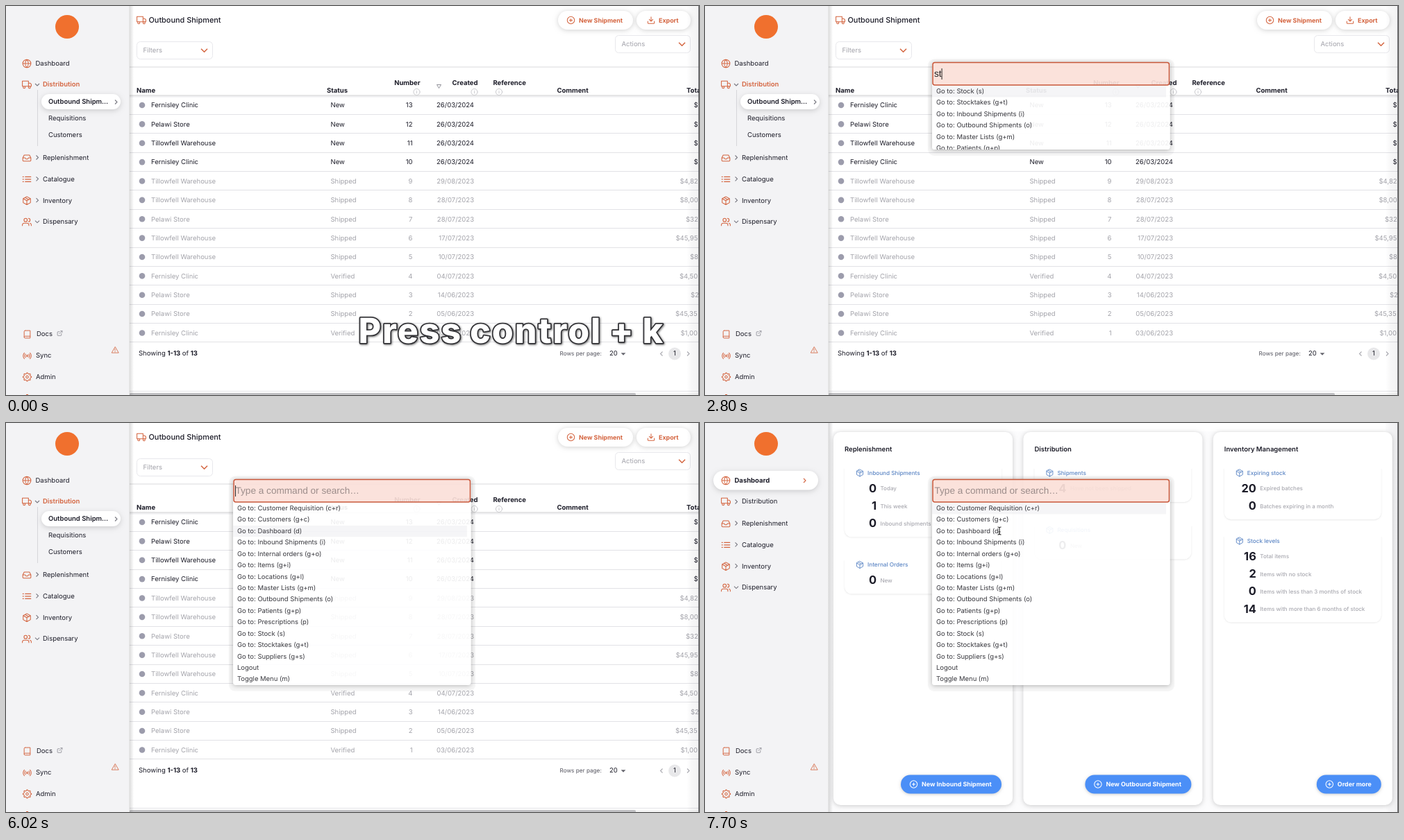
An HTML page with a canvas that plays this animation: 998 px wide and 561 px high, repeating every 8 s.

```html
<!DOCTYPE html>
<html lang="en">
<head>
<meta charset="utf-8">
<title>Command palette</title>
<style>
  html, body { margin: 0; width: 100%; height: 100%; overflow: hidden; background: #fff; }
  canvas { display: block; width: 998px; height: 561px; }
</style>
</head>
<body>
<canvas id="stage"></canvas>
<script>
const W = 998, H = 561, LOOP = 8000;
const canvas = document.getElementById('stage');
const ctx = canvas.getContext('2d');
const dpr = window.devicePixelRatio || 1;
canvas.width = W * dpr;
canvas.height = H * dpr;
ctx.textRendering = 'geometricPrecision';

const ORANGE = '#d4643f', INK = '#1c1c28', GREY = '#a3a3aa', BLUE = '#5b85c4';
const clamp = v => Math.max(0, Math.min(1, v));
const easeOut = p => 1 - (1 - clamp(p)) ** 2;
const smooth = p => { p = clamp(p); return p * p * (3 - 2 * p); };
const mix = (a, b, p) => a + (b - a) * p;

// Icons on a 24 unit grid
const ICONS = {
  globe: 'M22 12a10 10 0 1 1-20 0a10 10 0 1 1 20 0M2 12h20M12 2c5 6 5 14 0 20c-5-6-5-14 0-20',
  truck: 'M1 3h15v13H1zM16 8h4l3 3v5h-7M8 18.5a2.5 2.5 0 1 1-5 0a2.5 2.5 0 1 1 5 0M21 18.5a2.5 2.5 0 1 1-5 0a2.5 2.5 0 1 1 5 0',
  inbox: 'M22 12h-6l-2 3h-4l-2-3H2M5.5 5L2 12v6a2 2 0 0 0 2 2h16a2 2 0 0 0 2-2v-6l-3.500-7z',
  list: 'M8 6h14M8 12h14M8 18h14M2 6h2M2 12h2M2 18h2',
  box: 'M12 2l9 5v10l-9 5l-9-5V7zM3 7l9 5l9-5M12 12v10M7.500 4.500l9 5',
  users: 'M17 21v-2a4 4 0 0 0-4-4H5a4 4 0 0 0-4 4v2M13 7a4 4 0 1 1-8 0a4 4 0 1 1 8 0M23 21v-2a4 4 0 0 0-3-4M16 3a4 4 0 0 1 0 8',
  book: 'M4 19.500A2.500 2.500 0 0 1 6.500 17H20M6.500 2H20v20H6.500A2.500 2.500 0 0 1 4 19.500v-15A2.500 2.500 0 0 1 6.500 2',
  link: 'M18 13v6a2 2 0 0 1-2 2H5a2 2 0 0 1-2-2V8a2 2 0 0 1 2-2h6M15 3h6v6M10 14L21 3',
  radio: 'M14 12a2 2 0 1 1-4 0a2 2 0 1 1 4 0M16.200 7.800a6 6 0 0 1 0 8.500M7.800 16.200a6 6 0 0 1 0-8.500M19 5a10 10 0 0 1 0 14M5 19a10 10 0 0 1 0-14',
  alert: 'M12 3L1.500 21h21zM12 9v5M12 17v1',
  plus: 'M22 12a10 10 0 1 1-20 0a10 10 0 1 1 20 0M12 8v8M8 12h8',
  down: 'M21 15v4a2 2 0 0 1-2 2H5a2 2 0 0 1-2-2v-4M7 10l5 5l5-5M12 15V3',
  info: 'M22 12a10 10 0 1 1-20 0a10 10 0 1 1 20 0M12 11v5M12 8v.5',
  gear: gearPath()
};
for (const k in ICONS) ICONS[k] = new Path2D(ICONS[k]);

function gearPath() {
  let d = 'M15 12a3 3 0 1 1-6 0a3 3 0 1 1 6 0';
  for (let i = 0; i <= 32; i++) {
    const a = (i - .5) * Math.PI / 16, r = i % 4 < 2 ? 10.5 : 8;
    d += (i ? 'L' : 'M') + (12 + r * Math.cos(a)) + ' ' + (12 + r * Math.sin(a));
  }
  return d;
}

function icon(name, x, y, size = 14, color = ORANGE, weight = 1.8) {
  ctx.save();
  ctx.translate(x - size / 2, y - size / 2);
  ctx.scale(size / 24, size / 24);
  ctx.strokeStyle = color;
  ctx.lineWidth = weight;
  ctx.lineCap = ctx.lineJoin = 'round';
  ctx.stroke(ICONS[name]);
  ctx.restore();
}

function text(s, x, y, { size = 9.5, weight = 400, color = INK, align = 'left', family = 'Inter' } = {}) {
  ctx.font = `${weight} ${size}px ${family}, sans-serif`;
  ctx.fillStyle = color;
  ctx.textAlign = align;
  ctx.textBaseline = 'middle';
  ctx.fillText(s, x, y + .5);
  return ctx.measureText(s).width;
}

function rect(x, y, w, h, color) {
  ctx.fillStyle = color;
  ctx.fillRect(x, y, w, h);
}

function round(x, y, w, h, r, { fill, stroke, line = 1, shadow, blur = 6, dy = 1 } = {}) {
  ctx.save();
  ctx.beginPath();
  ctx.roundRect(x, y, w, h, r);
  if (shadow) {
    ctx.shadowColor = shadow;
    ctx.shadowBlur = blur * dpr;
    ctx.shadowOffsetY = dy * dpr;
  }
  if (fill) { ctx.fillStyle = fill; ctx.fill(); }
  ctx.shadowColor = 'transparent';
  if (stroke) { ctx.strokeStyle = stroke; ctx.lineWidth = line; ctx.stroke(); }
  ctx.restore();
}

function dot(x, y, r, color) {
  ctx.fillStyle = color;
  ctx.beginPath();
  ctx.arc(x, y, r, 0, 7);
  ctx.fill();
}

// Chevron pointing right, turned by quarter turns
function chevron(x, y, turn = 0, r = 3, color = '#777780', line = 1.1) {
  ctx.save();
  ctx.translate(x, y);
  ctx.rotate(turn * Math.PI / 2);
  ctx.strokeStyle = color;
  ctx.lineWidth = line;
  ctx.beginPath();
  ctx.moveTo(-r / 2, -r);
  ctx.lineTo(r / 2, 0);
  ctx.lineTo(-r / 2, r);
  ctx.stroke();
  ctx.restore();
}

function triangle(x, y, r, color, fill) {
  ctx.beginPath();
  ctx.moveTo(x - r, y - r / 2);
  ctx.lineTo(x + r, y - r / 2);
  ctx.lineTo(x, y + r / 2 + (fill ? 0 : 2));
  ctx.closePath();
  ctx.fillStyle = ctx.strokeStyle = color;
  ctx.lineWidth = .8;
  fill ? ctx.fill() : ctx.stroke();
}

// Sidebar; fold runs from 0 (section open) to 1 (closed)
function sidebar(onDash, fold) {
  const edge = ctx.createLinearGradient(177, 0, 184, 0);
  edge.addColorStop(0, 'rgba(0,0,0,.16)');
  edge.addColorStop(1, 'rgba(0,0,0,0)');
  rect(177, 0, 7, H, edge);
  rect(0, 0, 177.5, H, '#f3f3f5');
  dot(88, 30, 17, '#f0702e');

  if (onDash) {
    round(12, 69, 151, 27.5, 14, { fill: '#fff', shadow: 'rgba(0,0,0,.16)', blur: 7, dy: 2 });
    chevron(143.5, 83, 0, 3, ORANGE);
  }
  icon('globe', 30, 83);
  text('Dashboard', 42.5, 82.5, { weight: onDash ? 700 : 400 });

  icon('truck', 30, 113.5);
  chevron(45, 113.5, onDash ? 0 : 1);
  text('Distribution', 53, 113, onDash ? {} : { weight: 600, color: ORANGE });
  if (fold < 1) {
    ctx.save();
    ctx.beginPath();
    ctx.rect(0, 121, 177, 83 * (1 - fold));
    ctx.clip();
    rect(45, 121, 1, 81, '#d6d6da');
    if (!onDash) round(51, 127, 114, 22, 11, { fill: '#fff', shadow: 'rgba(0,0,0,.16)', blur: 7, dy: 2 });
    text('Outbound Shipm…', 61, 138, { weight: 600 });
    chevron(158.5, 138.5);
    text('Requisitions', 61, 162);
    text('Customers', 61, 186);
    ctx.restore();
  }
  [['inbox', 'Replenishment'], ['list', 'Catalogue'], ['box', 'Inventory'], ['users', 'Dispensary']].forEach(([ic, label], i) => {
    const y = 218.5 + i * 30.85 - 74 * fold;
    icon(ic, 30, y + .5);
    chevron(45, y, i === 3 ? 1 : 0);
    text(label, 53, y);
  });

  icon('book', 30.5, 473.5, 13);
  text('Docs', 44, 473);
  icon('link', 77.5, 472, 9, '#777780');
  icon('radio', 30.5, 504.5);
  text('Sync', 43, 504);
  icon('alert', 157, 496, 11);
  icon('gear', 30.5, 535, 14);
  text('Admin', 43, 534.5);
  rect(29, 560, 3, 1, ORANGE);
}

const CLINIC = 'Fernisley Clinic', STORE = 'Pelawi Store', DEPOT = 'Tillowfell Warehouse';
const ROWS = [
  [CLINIC, 'New', '26/03/2024', '$', 990.5],
  [STORE, 'New', '26/03/2024', '$', 990.5],
  [DEPOT, 'New', '26/03/2024', '$', 990.5],
  [CLINIC, 'New', '26/03/2024', '$', 990.5],
  [DEPOT, 'Shipped', '29/08/2023', '$4,82', 970.5],
  [DEPOT, 'Shipped', '28/07/2023', '$8,00', 970.5],
  [STORE, 'Shipped', '28/07/2023', '$32', 979],
  [DEPOT, 'Shipped', '17/07/2023', '$45,95', 964.5],
  [DEPOT, 'Shipped', '10/07/2023', '$8', 985],
  [CLINIC, 'Verified', '04/07/2023', '$4,50', 970],
  [STORE, 'Shipped', '14/06/2023', '$2', 986],
  [STORE, 'Shipped', '05/06/2023', '$45,35', 964],
  [CLINIC, 'Verified', '03/06/2023', '$1,00', 971.5]
];

function rightEdge() {
  const g = ctx.createLinearGradient(980, 0, 998, 0);
  g.addColorStop(0, 'rgba(0,0,20,0)');
  g.addColorStop(.4, 'rgba(0,0,20,.03)');
  g.addColorStop(1, 'rgba(0,0,20,.05)');
  rect(980, 0, 18, H, g);
  rect(997, 0, 1, H, 'rgba(60,60,65,.7)');
}

function pillButton(x, w, ic, label) {
  round(x, 7, w, 27, 13.5, { fill: '#fff', shadow: 'rgba(0,0,0,.18)', blur: 7 });
  icon(ic, x + (ic === 'plus' ? 18.5 : 21), 20.5, 12.5, ORANGE, 2);
  text(label, x + (ic === 'plus' ? 30 : 32), 20.5, { size: 8.9, weight: 700, color: ORANGE });
}

function select(x, y, w, h, label) {
  round(x, y, w, h, 5, { fill: '#fff', stroke: '#e8e8ec' });
  text(label, x + 9, y + h / 2, { color: '#a0a0a8' });
  chevron(x + w - 12, y + h / 2, 1, 4.5, ORANGE, 1.5);
}

function tablePage() {
  rect(177, 0, 821, H, '#fff');
  icon('truck', 195, 20.5);
  text('Outbound Shipment', 205.5, 20.5, { size: 10.9, weight: 500 });
  pillButton(795, 108, 'plus', 'New Shipment');
  pillButton(908, 78, 'down', 'Export');
  select(188.5, 51.5, 109, 25, 'Filters');
  select(877.5, 42.5, 108, 25, 'Actions');

  rect(178, 87.5, 820, 1, '#d9d9dc');
  const head = { weight: 700 }, headR = { weight: 700, align: 'right' };
  text('Name', 188, 121.5, head);
  text('Status', 462, 121.5, head);
  text('Number', 596.5, 110.5, headR);
  text('Created', 679.5, 110.5, headR);
  text('Reference', 701.5, 110.5, head);
  text('Comment', 793.5, 121.5, head);
  text('Total', 980, 121.5, head);
  [591.5, 674.5, 710].forEach(x => icon('info', x, 124, 11, '#b4b4ba', 1.5));
  triangle(623.5, 115, 3, '#777780');
  rect(178, 128.5, 820, 1.2, '#cfcfd2');
  rect(178, 129.7, 820, 2, '#f0f0f2');

  ROWS.forEach(([name, status, date, total, tx], i) => {
    const y = 143 + i * 27.37, color = i < 4 ? INK : GREY;
    dot(196, y, 4.3, '#9c9cac');
    text(name, 209, y, { color });
    text(status, 467.5, y, { color });
    text(13 - i, 585.5, y, { color, align: 'right' });
    text(date, 674, y, { color, align: 'right' });
    text(total, tx, y, { color });
    rect(178, Math.round(y + 13), 820, 1, '#e2e2e6');
  });

  let x = 191;
  x += text('Showing ', x, 501);
  x += text('1-13', x, 501, { weight: 700 });
  x += text(' of ', x, 501);
  text('13', x, 501, { weight: 700 });
  text('Rows per page:', 797.5, 501, { size: 8.2, color: '#55555f' });
  text('20', 869, 501);
  triangle(889, 502, 3.4, '#66666e', true);
  chevron(944, 501.5, 2, 3, '#aaaab0');
  dot(963, 501.5, 9, '#e8e8ea');
  text('1', 963, 501, { align: 'center' });
  chevron(982.5, 501.5, 0, 3, '#aaaab0');
  rect(178, 555, 820, 1, '#e2e2e6');
  rect(178, 558, 820, 3, '#f5f5f5');
  round(178, 558, 729, 4, 2, { fill: '#c1c1c4' });
  rightEdge();
}

// Each card: heading, heading y, stats as [value, label]
const PANELS = [
  ['Replenishment', 'New Inbound Shipment', 145, [
    ['Inbound Shipments', 72, [[0, 'Today'], [1, 'This week'], [0, 'Inbound shipments not delivered']]],
    ['Internal Orders', 204.5, [[0, 'New']]]]],
  ['Distribution', 'New Outbound Shipment', 153, [
    ['Shipments', 72, [[4, 'Have not been shipped']]],
    ['Requisitions', 154.5, [[0, 'New']]]]],
  ['Inventory Management', 'Order more', 93, [
    ['Expiring stock', 72, [[20, 'Expired batches'], [0, 'Batches expiring in a month']]],
    ['Stock levels', 170, [[16, 'Total items'], [2, 'Items with no stock'],
      [0, 'Items with less than 3 months of stock'], [14, 'Items with more than 6 months of stock']]]]]
];

function dashboardPage() {
  rect(177, 0, 821, H, '#fcfcfd');
  rect(184, 0, 796, 12, '#fff');
  rightEdge();
  PANELS.forEach(([title, button, bw, cards], i) => {
    const x = 201 + i * 273.4;
    round(x - 16, 13, 258, 538, 10, { fill: '#fff', shadow: 'rgba(0,0,0,.2)', blur: 7 });
    text(title, x, 37.5, { weight: 600 });
    cards.forEach(([name, y, stats]) => {
      const h = 42 + 25.2 * (stats.length - 1);
      round(x, y - 15, 226, h + 15, 10, { fill: '#fff', shadow: 'rgba(0,0,0,.1)', blur: 2, dy: .7 });
      rect(x - 2, y - 18, 230, 12, '#fff');
      icon('box', x + 22, y, 12, BLUE);
      text(name, x + 33, y, { size: 8.2, weight: 500, color: BLUE });
      stats.forEach(([n, label], k) => {
        const sy = y + 22.5 + k * 25.2;
        text(n, x + 46, sy, { size: 16.4, weight: 700, align: 'right' });
        text(label, x + 51.5, sy, { size: 8, weight: 500, color: '#a9a9b0' });
      });
    });
    const bx = x + 226 - bw;
    round(bx, 507.5, bw, 27, 13.5, { fill: '#4b8ff7', shadow: 'rgba(0,0,0,.2)', blur: 4 });
    icon('plus', bx + 18.5, 521, 12.5, '#fff', 2);
    text(button, bx + 30, 521, { size: 8.9, weight: 700, color: '#fff' });
  });
}

const COMMANDS = ['Customer Requisition (c+r)', 'Customers (g+c)', 'Dashboard (d)', 'Inbound Shipments (i)',
  'Internal orders (g+o)', 'Items (g+i)', 'Locations (g+l)', 'Master Lists (g+m)', 'Outbound Shipments (o)',
  'Patients (g+p)', 'Prescriptions (p)', 'Stock (s)', 'Stocktakes (g+t)', 'Suppliers (g+s)']
  .map(s => 'Go to: ' + s).concat('Logout', 'Toggle Menu (m)');
const pick = (...ids) => ids.map(i => COMMANDS[i]);
const bottomOf = n => 115 + 16.43 * n;

// Query states: start, typed text, results, list bottom
const STATES = [
  [0, '', COMMANDS, bottomOf(16)],
  [2100, 's', pick(11, 12, 13, 5, 0, 1, 2, 3, 4, 6, 7, 8, 9, 10), bottomOf(14)],
  [2660, 'st', pick(11, 12, 3, 8, 7, 9), 207],
  [2990, 'sto', pick(11, 12, 8), bottomOf(3)],
  [4620, '', COMMANDS, bottomOf(16)]
];
const OPEN_1 = 1150, CLOSE = 6020, OPEN_2 = 7030;

// Halo and shadow, kept outside the see-through panel
function paletteShadow(bottom) {
  ctx.save();
  ctx.beginPath();
  ctx.rect(0, 0, W, H);
  ctx.roundRect(327, 81, 342.5, bottom - 81, 4);
  ctx.clip('evenodd');
  round(321, 76.5, 355, bottom - 67.5, 9, { fill: 'rgba(0,0,0,.035)' });
  round(327, 81, 342.5, bottom - 81, 4, { fill: '#fff', shadow: 'rgba(0,0,0,.28)', blur: 6 });
  ctx.restore();
}

function palette(t) {
  const opened = t < CLOSE + 100 ? OPEN_1 : OPEN_2;
  if (t < opened) return;
  const q = easeOut((t - opened) / 200) * 2;
  let alpha = Math.min(1, q), scale = q < 1 ? .99 + .02 * q : 1.01 - .01 * (q - 1);
  if (opened === OPEN_1 && t > CLOSE) {
    alpha = 1 - (t - CLOSE) / 100;
    scale = 1 - .01 * (1 - alpha);
  }

  let i = STATES.length - 1;
  while (STATES[i][0] > t) i--;
  const [start, query, items, end] = STATES[i];
  const bottom = mix(i ? STATES[i - 1][3] : end, end, easeOut((t - start) / 110));
  const selected = t > 3780 && t < 4620;
  const active = t > 5350 && t < OPEN_2 ? 2 : 0;

  ctx.save();
  ctx.globalAlpha = alpha;
  ctx.translate(498, 230);
  ctx.scale(scale, scale);
  ctx.translate(-498, -230);

  paletteShadow(bottom);
  round(327, 114, 342.5, bottom - 114, [0, 0, 4, 4], { fill: 'rgba(255,255,255,.92)' });
  round(328, 81.5, 340.5, 32.5, 3, { fill: 'rgba(251,224,217,.93)', stroke: '#c8573a', line: 1.5 });

  const field = { size: 13.6, family: '"Liberation Sans", Arial' };
  if (selected) rect(329.5, 90, 18.5, 16, '#b3cdec');
  if (query) text(query, 330, 98, { ...field, color: '#222' });
  else text('Type a command or search…', 330.5, 98, { ...field, color: '#9b8c8a' });
  const since = t - (opened === OPEN_2 ? 7190 : Math.max(start, OPEN_1));
  if (!selected && (since < 0 || since % 1000 < 500)) {
    ctx.font = '13.6px "Liberation Sans", Arial, sans-serif';
    rect(330 + ctx.measureText(query).width, 90, 1, 16, '#222');
  }

  ctx.beginPath();
  ctx.rect(327, 114.5, 343, bottom - 114.5);
  ctx.clip();
  rect(327, 115 + active * 16.43, 337, 16.4, 'rgba(20,20,60,.04)');
  items.forEach((s, k) => text(s, 333, 122.7 + k * 16.43, { size: 9.45, color: '#36363c' }));
  ctx.restore();
}

function pointer(t) {
  const moving = t >= 5110 && t < CLOSE;
  if (!moving && t < 7250) return;
  const p = moving ? smooth((t - 5110) / 350) : 1;
  ctx.save();
  ctx.translate(mix(450, 424, p), mix(270, 155.5, p));
  for (const [color, line] of [['#fff', 2.6], ['#222', 1.1]]) {
    ctx.strokeStyle = color;
    ctx.lineWidth = line;
    ctx.stroke(new Path2D('M-2.500-5.500Q0-5.500 0-4V4Q0 5.500-2.500 5.500M2.500-5.500Q0-5.500 0-4V4Q0 5.500 2.500 5.500M-1.500 1.500h3'));
  }
  ctx.restore();
}

function caption(t) {
  const alpha = 1 - clamp((t - 40) / 480);
  if (!alpha) return;
  ctx.save();
  ctx.globalAlpha = alpha;
  ctx.font = '800 50px Inter, sans-serif';
  ctx.letterSpacing = '2px';
  ctx.wordSpacing = '-2px';
  ctx.textAlign = 'left';
  ctx.textBaseline = 'alphabetic';
  ctx.lineJoin = 'round';
  ctx.shadowColor = 'rgba(0,0,0,.55)';
  ctx.shadowBlur = 3 * dpr;
  ctx.shadowOffsetX = ctx.shadowOffsetY = dpr;
  ctx.strokeStyle = '#303034';
  ctx.lineWidth = 3.4;
  ctx.strokeText('Press control + k', 507.5, 486);
  ctx.shadowColor = 'transparent';
  ctx.fillStyle = '#fff';
  ctx.fillText('Press control + k', 507.5, 486);
  ctx.restore();
}

function draw(t) {
  ctx.setTransform(dpr, 0, 0, dpr, 0, 0);
  const onDash = t >= 6090;
  onDash ? dashboardPage() : tablePage();
  sidebar(onDash, smooth((t - 6060) / 240));
  palette(t);
  pointer(t);
  caption(t);
}

const begin = performance.now();
function tick() {
  draw((performance.now() - begin) % LOOP);
  requestAnimationFrame(tick);
}
tick();
</script>
</body>
</html>
```
